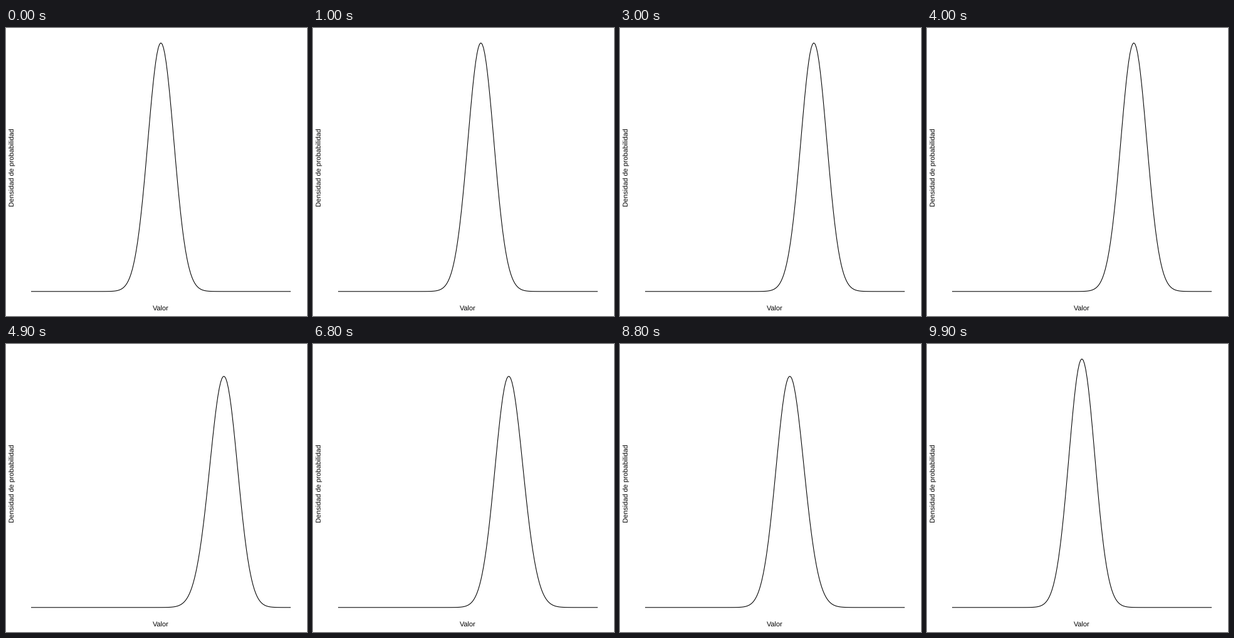
These frames come from a looping animation (480x460 px, 10000 ms). A matplotlib script:

```python
import matplotlib.pyplot as plt
import numpy as np
from matplotlib.animation import FuncAnimation

W, H, DPI = 480, 460, 72
FRAMES, STEP_MS, TWEEN = 100, 100, 5
LEFT, RIGHT, TOP, BASE = 40, 454, 23.8, 420.8

plt.rcParams.update({
    "font.family": "Liberation Sans",
    "font.size": 11,
    "text.hinting": "none",
    "text.hinting_factor": 1,
    "path.simplify": False,
})

# The mean climbs from 0 to 5 and back, one unit per transition.
means = [0, 1, 2, 3, 4, 5, 4, 3, 2, 1, 0]
starts = [6, 16, 26, 36, 46, 55, 65, 75, 85, 95]

x = np.linspace(-10, 10, 201)
px = LEFT + (x + 10) / 20 * (RIGHT - LEFT)


def bell(mean):
    return np.exp(-(x - mean) ** 2 / 2)


def density(frame):
    """Blend the heights of neighbouring bells linearly."""
    y = bell(means[0])
    for start, old, new in zip(starts, means, means[1:]):
        if frame >= start:
            t = min((frame - start + 1) / TWEEN, 1)
            y = (1 - t) * bell(old) + t * bell(new)
    return y


fig = plt.figure(figsize=(W / DPI, H / DPI), dpi=DPI, facecolor="white")
ax = fig.add_axes([0, 0, 1, 1])
ax.set_xlim(0, W)
ax.set_ylim(H, 0)
ax.axis("off")

curve, = ax.plot([], [], color="black", lw=1.07, snap=False,
                 solid_capstyle="butt", solid_joinstyle="round")
ax.text((LEFT + RIGHT) / 2, 451.6, "Valor", ha="center", va="baseline")
ax.text(13.6, (TOP + BASE) / 2, "Densidad de probabilidad", rotation=90,
        rotation_mode="anchor", ha="center", va="baseline")


def update(frame):
    curve.set_data(px, BASE - density(frame) * (BASE - TOP))
    return curve,


anim = FuncAnimation(fig, update, frames=FRAMES, interval=STEP_MS,
                     repeat=True, repeat_delay=0)
plt.show()
```
